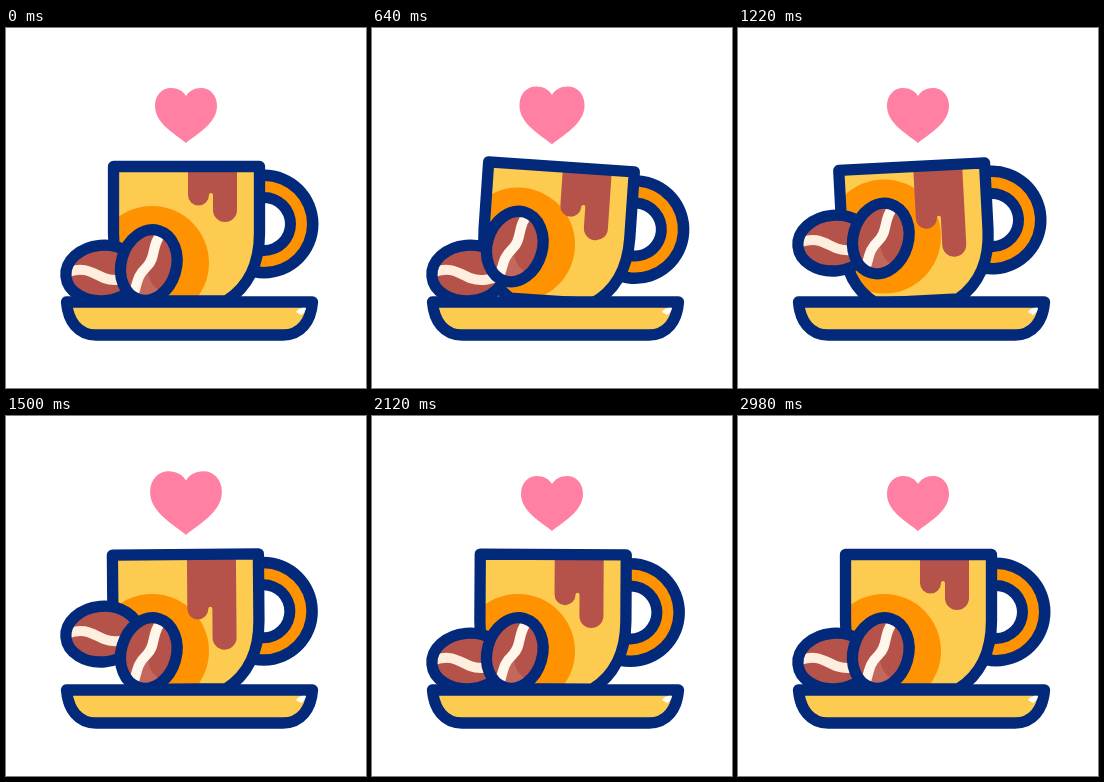
Recreate the animation shown at these times as an HTML page. Size 360 by 360 pixels, loop 3 s.

```html
<!DOCTYPE html>
<html lang="en">
<head>
<meta charset="utf-8">
<title>Coffee cup</title>
<style>
  html, body { margin: 0; width: 100%; height: 100%; overflow: hidden; background: #fff; }
  svg { display: block; width: 100vw; height: 100vh; }
  .line { stroke: #032a7a; stroke-width: 11.3; stroke-linejoin: round; }
  .navy { fill: #032a7a; }
  .yellow { fill: #fccb50; }
  .orange { fill: #ff9200; }
  .brown { fill: #b5534b; }
  .crease { fill: none; stroke-width: 10; }
</style>
</head>
<body>
<svg viewBox="0 0 360 360">
  <defs>
    <path id="cupShape" d="M107.5 138.5H253.5V205C253.5 237 241 260 220 273H138C118 260 107.5 237 107.5 205Z"/>
    <ellipse id="rearShape" cx="96.5" cy="245" rx="36.7" ry="27.8" transform="rotate(-5 96.5 245)"/>
    <ellipse id="frontShape" cx="142.8" cy="237" rx="27.6" ry="35.8" transform="rotate(16 142.8 237)"/>
    <clipPath id="cupClip"><use href="#cupShape"/></clipPath>
    <clipPath id="rearClip"><use href="#rearShape"/></clipPath>
    <clipPath id="frontClip"><use href="#frontShape"/></clipPath>
  </defs>

  <path id="heart" fill="#ff80a3" d="M180 115C171 107 149 96 149 78C149 67 156 60 165 60C172 60 177 63 180 68C183 63 188 60 195 60C204 60 211 67 211 78C211 96 189 107 180 115Z"/>

  <g id="cup">
    <circle class="navy" cx="258" cy="196" r="54.5"/>
    <circle class="orange" cx="258" cy="196" r="43"/>
    <circle class="navy" cx="258" cy="196" r="32"/>
    <circle fill="#fff" cx="258" cy="196" r="21"/>
    <use class="yellow" href="#cupShape"/>
    <g clip-path="url(#cupClip)">
      <circle id="glow" class="orange" cx="146" cy="235" r="57"/>
    </g>
    <path id="drip" class="brown"/>
    <use class="line" fill="none" href="#cupShape"/>
  </g>

  <path class="yellow line" d="M60.5 274H306.5C305 293 295 307 277 307H90C72 307 62 293 60.5 274Z"/>
  <path fill="#fff" d="M290 284Q294 279 300 280Q299 285 295 287Z"/>

  <g id="rear">
    <use class="brown" href="#rearShape"/>
    <path class="crease" stroke="#ffeedd" clip-path="url(#rearClip)" d="M60 245C78 237 88 246 98 250C108 254 118 252 134 246"/>
    <use class="line" fill="none" href="#rearShape"/>
  </g>
  <g id="front">
    <use class="brown" href="#frontShape"/>
    <g clip-path="url(#frontClip)">
      <path fill="#c4675c" d="M144 230Q137 254 156 264L128 276Z"/>
      <path class="crease" stroke="#fff6ec" d="M157 203C144 218 151 229 140.500 239C130 249 132 255 126 271"/>
    </g>
    <use class="line" fill="none" href="#frontShape"/>
  </g>
</svg>
<script>
const LOOP = 3000;
const part = id => document.getElementById(id);
const [heart, cup, glow, drip, rear, front] =
  ['heart', 'cup', 'glow', 'drip', 'rear', 'front'].map(part);
const move = (el, value) => el.setAttribute('transform', value);
const ease = p => (1 - Math.cos(Math.PI * p)) / 2;

// Eased interpolation through [time, value] keys
function tween(t, keys) {
  const i = keys.findIndex(([time]) => t < time);
  if (i < 0) return keys[keys.length - 1][1];
  if (i === 0) return keys[0][1];
  const [t0, a] = keys[i - 1], [t1, b] = keys[i];
  return a + (b - a) * ease((t - t0) / (t1 - t0));
}

const hop = (t, start, end, height) =>
  t <= start || t >= end ? 0 : -height * Math.sin(Math.PI * (t - start) / (end - start));

// Two round-ended streams that lengthen at different rates
const dripPath = flow => `M182 142V${167 + 26 * flow}a10.5 10.5 0 0 0 21 0a2 2 0 0 1 4 0` +
  `V${182 + 40 * flow}a12 12 0 0 0 24 0V142Z`;

const swing = [[0, 0], [600, 4], [1200, -3], [1800, 2], [2400, -1], [3000, 0]];
const beat = [[250, 1], [450, 1.17], [750, 1]];
const pour = [[0, 0], [1500, 1], [1800, 1], [2400, 0]];

function draw(t) {
  const angle = tween(t, swing);
  const frontY = hop(t, 475, 1475, 37);
  const size = tween(t % 1000, beat);
  move(cup, `rotate(${angle} 180 270)`);
  move(glow, `rotate(${-angle} 180 270) translate(0 ${frontY})`);
  move(front, `translate(0 ${frontY})`);
  move(rear, `translate(0 ${hop(t, 860, 1800, 32)})`);
  move(heart, `translate(180 90) scale(${size}) translate(-180 -90)`);
  drip.setAttribute('d', dripPath(tween(t, pour)));
}

const start = performance.now();
function frame() {
  draw((performance.now() - start) % LOOP);
  requestAnimationFrame(frame);
}
frame();
</script>
</body>
</html>
```
